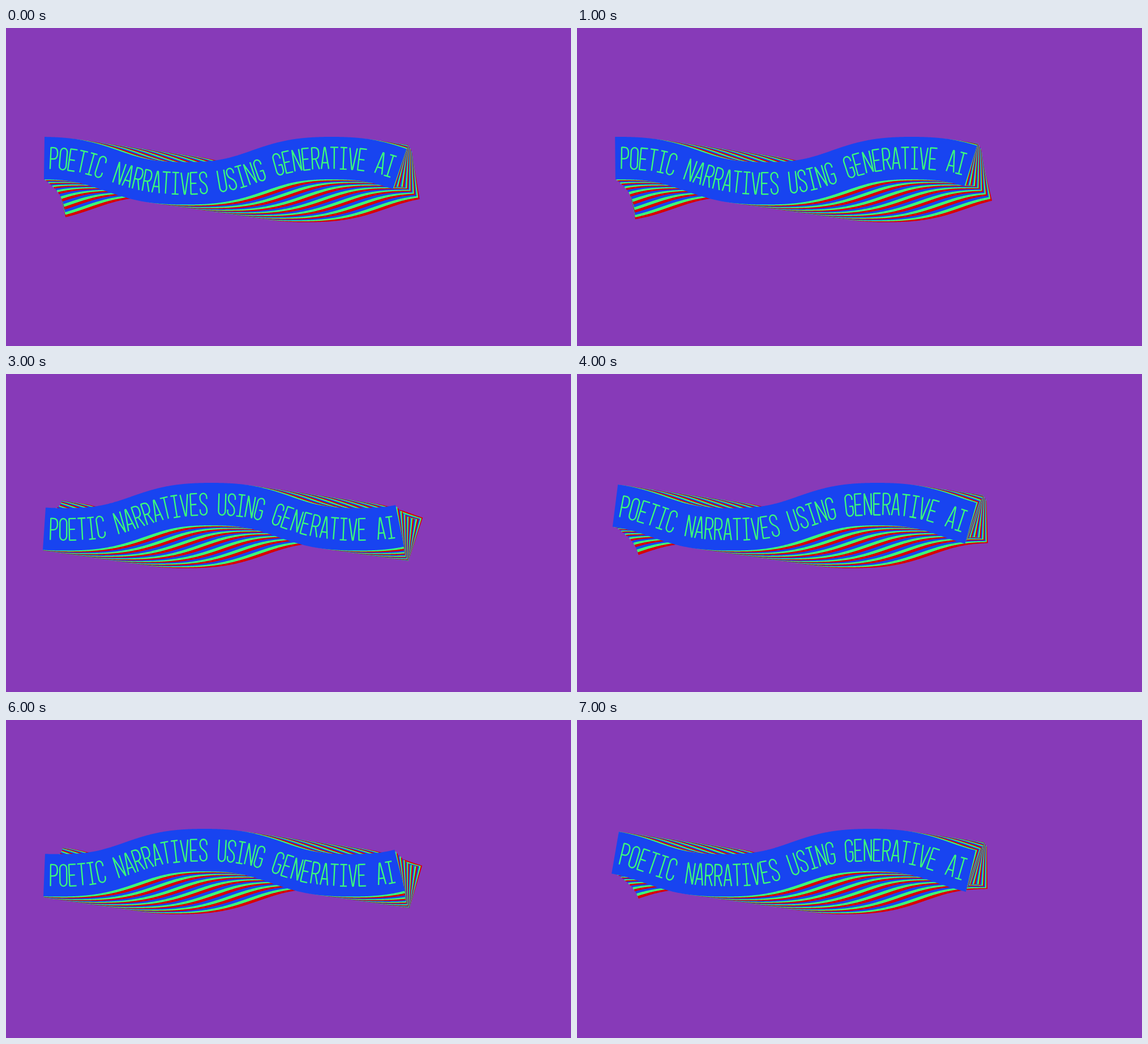
An HTML page with a canvas that plays this animation: 998 px wide and 561 px high, repeating every 8000 ms.

```html
<!DOCTYPE html>
<html lang="en">
<head>
<meta charset="utf-8">
<title>Wavy ribbon</title>
<style>
  html, body { margin: 0; width: 998px; height: 561px; overflow: hidden; background: #873ab8; }
  canvas { display: block; }
</style>
</head>
<body>
<canvas id="stage" width="998" height="561" role="img" aria-label="Poetic narratives using generative AI"></canvas>
<script>
const ctx = document.getElementById('stage').getContext('2d');
const TEXT = 'POETIC NARRATIVES USING GENERATIVE AI';
const BLUE = '#1844f0', GREEN = '#3cff78', RED = '#d80000';
const COLORS = [BLUE, GREEN, RED];

const LEFT = 67.5, RIGHT = 695.5, MIDDLE = 251.8;
const THICKNESS = 75, AMPLITUDE = 22.3, WAVELENGTH = 517;
const LAYERS = 21, SHIFT_X = 29, SHIFT_Y = 31, LEAD = 215;
const PITCH = 16.5, TEXT_LEFT = 76.5;

// Thin monoline capitals, centred on the origin
const GLYPHS = {
  P: 'M-6 19V-19H-1Q6-19 6-9T-1 1H-6',
  O: 'M-6-12a6 7 0 0 1 12 0V12a6 7 0 0 1-12 0Z',
  E: 'M6-19H-6V19H6M-6 0H4',
  T: 'M-7-19H7M0-19V19',
  I: 'M-6-19H6M0-19V19M-6 19H6',
  C: 'M6-9V-12a6 7 0 0 0-12 0V12a6 7 0 0 0 12 0V9',
  N: 'M-6 19V-19L6 19V-19',
  A: 'M-6.5 19L-.7-19H.7L6.5 19M-4.8 8H4.8',
  R: 'M-6 19V-19H-1Q6-19 6-9T-1 1H-6M0 1L6 19',
  V: 'M-6.5-19L-.7 19H.7L6.5-19',
  S: 'M6-9V-12a6 7 0 0 0-12 0C-6 2 6-3 6 12a6 7 0 0 1-12 0V9',
  U: 'M-6-19V12a6 7 0 0 0 12 0V-19',
  G: 'M6-9V-12a6 7 0 0 0-12 0V12a6 7 0 0 0 12 0V2H0',
};
for (const key in GLYPHS) GLYPHS[key] = new Path2D(GLYPHS[key]);

// A sine with slightly flattened crests
function wave(x, crest) {
  const angle = (x - crest) / WAVELENGTH * 2 * Math.PI;
  return -AMPLITUDE * (Math.cos(angle) - 0.065 * Math.cos(3 * angle)) / 0.935;
}

// The wave starts slowly, then travels at a steady pace
function crestAt(step) {
  return 575 + (step < 2 ? 16 * step : 136 + 168.3 * (step - 2));
}

function drawLayer(index, crest) {
  const depth = index / (LAYERS - 1);
  const dx = SHIFT_X * depth, dy = MIDDLE + SHIFT_Y * depth;
  ctx.beginPath();
  for (let x = LEFT; x <= RIGHT; x += 1) {
    ctx.lineTo(x + dx, dy + wave(x + dx, crest + LEAD * depth));
  }
  ctx.lineWidth = THICKNESS;
  ctx.strokeStyle = COLORS[index % 3];
  ctx.stroke();
}

function drawText(crest) {
  ctx.strokeStyle = GREEN;
  ctx.lineWidth = 2.3;
  [...TEXT].forEach((letter, i) => {
    if (letter === ' ') return;
    const x = TEXT_LEFT + PITCH * (i + 0.5);
    ctx.save();
    ctx.translate(x, MIDDLE + wave(x, crest));
    ctx.rotate(Math.atan((wave(x + 1, crest) - wave(x - 1, crest)) / 2));
    ctx.stroke(GLYPHS[letter]);
    ctx.restore();
  });
}

function draw() {
  const step = Math.floor(performance.now() / 1000) % 8;
  const crest = crestAt(step);
  ctx.clearRect(0, 0, 998, 561);
  for (let i = LAYERS - 1; i >= 0; i--) drawLayer(i, crest);
  drawText(crest);
  requestAnimationFrame(draw);
}
ctx.lineJoin = 'bevel';
draw();
</script>
</body>
</html>
```
